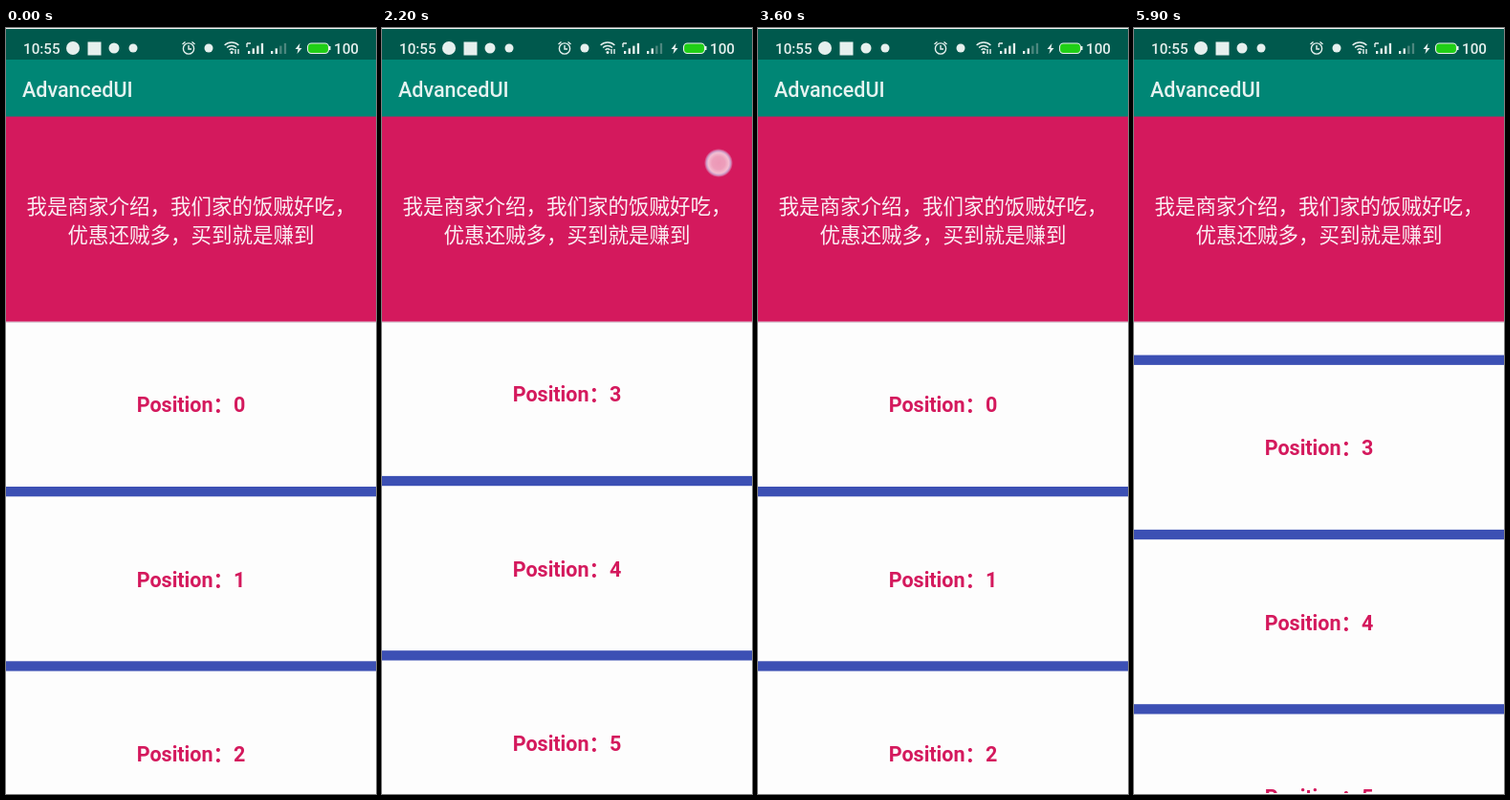
Write an HTML page with a canvas that moves like this. It is 387x800 px and loops after 6000 ms.

```html
<!DOCTYPE html>
<html lang="zh-CN">
<head>
<meta charset="utf-8">
<style>
  html, body { margin: 0; width: 100%; height: 100%; overflow: hidden; background: #fdfdfd; }
  canvas { display: block; width: 387px; height: 800px; }
</style>
</head>
<body>
<canvas id="stage" width="387" height="800"></canvas>
<script>
const ctx = document.getElementById('stage').getContext('2d');
const W = 387, H = 800, LOOP = 6000, STEP = 100;
const LIST_TOP = 307, ITEM = 172, PITCH = 182.3;
const FAMILY = 'Roboto, "Noto Sans CJK SC", "Noto Sans CJK", sans-serif';

// [time, finger x, finger y, list scroll]
const KEYS = [
  [0, 290, 700, 0], [900, 290, 700, 0], [1000, 292, 688, 0],
  [1500, 323, 252, 439], [1850, 345, 165, 535], [2200, 352, 141, 558],
  [2900, 293, 474, 244.4], [3400, 285, 716, 0], [3600, 285, 716, 0],
  [4700, 290, 700, 0], [4800, 293, 685, 0], [5300, 338, 236, 452],
  [5400, 341, 215, 476], [5600, 341, 215, 502], [6000, 341, 215, 502]
];
const TOUCHES = [[900, 3600], [4700, 5400]];

function rate(i, col) {
  const a = KEYS[i], b = KEYS[i + 1];
  return (b[col] - a[col]) / (b[0] - a[0]);
}

// Slope at a key that never overshoots its neighbours.
function slope(i, col) {
  if (i === 0 || i === KEYS.length - 1) return 0;
  const a = rate(i - 1, col), b = rate(i, col);
  return a * b > 0 ? 2 * a * b / (a + b) : 0;
}

function valueAt(t, col) {
  const i = KEYS.findIndex((k, n) => t < KEYS[n + 1][0]);
  const a = KEYS[i], b = KEYS[i + 1], d = b[0] - a[0], u = (t - a[0]) / d;
  const ease = u * u * (3 - 2 * u);
  return a[col] + (b[col] - a[col]) * ease
    + d * u * (1 - u) * ((1 - u) * slope(i, col) - u * slope(i + 1, col));
}

function rect(color, x, y, w, h) {
  ctx.fillStyle = color;
  ctx.fillRect(x, y, w, h);
}

function text(str, x, y, size, weight, color, align = 'left') {
  ctx.font = `${weight} ${size}px ${FAMILY}`;
  ctx.fillStyle = color;
  ctx.textAlign = align;
  ctx.fillText(str, x, y);
}

function disc(color, x, y, r) {
  ctx.fillStyle = color;
  ctx.beginPath();
  ctx.arc(x, y, r, 0, 7);
  ctx.fill();
}

function arc(x, y, r, from = 0, to = Math.PI * 2) {
  ctx.beginPath();
  ctx.arc(x, y, r, from, to);
  ctx.stroke();
}

function path(d, fill) {
  const p = new Path2D(d);
  fill ? ctx.fill(p) : ctx.stroke(p);
}

function signal(x, strong) {
  for (let i = 0; i < 4; i++) {
    const h = 3 + i * 2.7;
    rect(i < strong ? '#e8f2f0' : '#4c877e', x + i * 4.6, 27 - h, 2.3, h);
  }
}

function statusBar() {
  const ink = '#e6f0ee';
  rect('#00594d', 0, 0, W, 33);
  rect('#f4f7f6', 0, 0, W, 1);
  text('10:55', 18, 26.5, 15.2, 500, ink);
  text('100', 343, 26.5, 15.2, 500, ink);
  disc(ink, 70, 21, 7);
  rect(ink, 85.5, 14.5, 14, 14);
  disc(ink, 113, 21, 5.5);
  disc(ink, 133, 21, 4.5);
  disc(ink, 212, 21, 4.5);

  ctx.strokeStyle = ink;
  ctx.lineWidth = 1.4;
  arc(191, 21.5, 5.6);
  path('M191 18v4h3M184.5 17l3-2.5M197.5 17l-3-2.5');
  for (const r of [3.5, 7, 10.5]) arc(236, 25.5, r, -2.35, -0.79);
  disc(ink, 236, 25.5, 1.5);
  path('M240 27v-5M243 22v5');

  signal(253, 4);
  path('M252 16h4M252 16v4');
  signal(277, 2);
  ctx.fillStyle = ink;
  path('M307.5 16l-5 6h3l-1 5 5-6h-3z', true);

  ctx.fillStyle = '#20cf16';
  ctx.lineWidth = 1.1;
  ctx.beginPath();
  ctx.roundRect(315.5, 16, 22, 10.5, 4);
  ctx.fill();
  ctx.stroke();
  rect(ink, 338, 19, 1.5, 4);
}

function list(scroll) {
  rect('#fdfdfd', 0, LIST_TOP, W, H - LIST_TOP);
  for (let i = Math.floor(scroll / PITCH); i * PITCH - scroll < H - LIST_TOP; i++) {
    const y = LIST_TOP + i * PITCH - scroll;
    rect('#3c50b4', 0, y + ITEM, W, PITCH - ITEM);
    text('Position：' + i, W / 2, y + 94.4, 21.5, 700, '#d4195d', 'center');
  }
  rect('#fdfdfd', 0, H - 1, W, 1);
}

function header() {
  rect('#d4195d', 0, 92, W, LIST_TOP - 92);
  rect('#6a4f69', 0, 92, W, 1);
  rect('#d86f98', 0, LIST_TOP - 1, W, 1);
  rect('#dcd3da', 0, LIST_TOP, W, 1);
  text('我是商家介绍，我们家的饭贼好吃，', 21.5, 193.5, 21.5, 400, '#fbeef3');
  text('优惠还贼多，买到就是赚到', 64.5, 224, 21.5, 400, '#fbeef3');
  rect('#008675', 0, 33, W, 59);
  text('AdvancedUI', 17, 71.5, 21.5, 500, '#e6f3f1');
}

function finger(x, y) {
  const glow = ctx.createRadialGradient(x, y, 0, x, y, 15);
  glow.addColorStop(0, 'rgba(255,255,255,.55)');
  glow.addColorStop(0.45, 'rgba(255,255,255,.58)');
  glow.addColorStop(0.72, 'rgba(255,255,255,.72)');
  glow.addColorStop(0.83, 'rgba(205,205,240,.75)');
  glow.addColorStop(1, 'rgba(225,225,245,0)');
  disc(glow, x, y, 15);
}

function draw(now) {
  const t = Math.floor(now % LOOP / STEP) * STEP;
  list(valueAt(t, 3));
  header();
  statusBar();
  if (TOUCHES.some(([from, to]) => t >= from && t < to)) finger(valueAt(t, 1), valueAt(t, 2));
  requestAnimationFrame(() => draw(performance.now() - start));
}

const start = performance.now();
draw(0);
</script>
</body>
</html>
```
